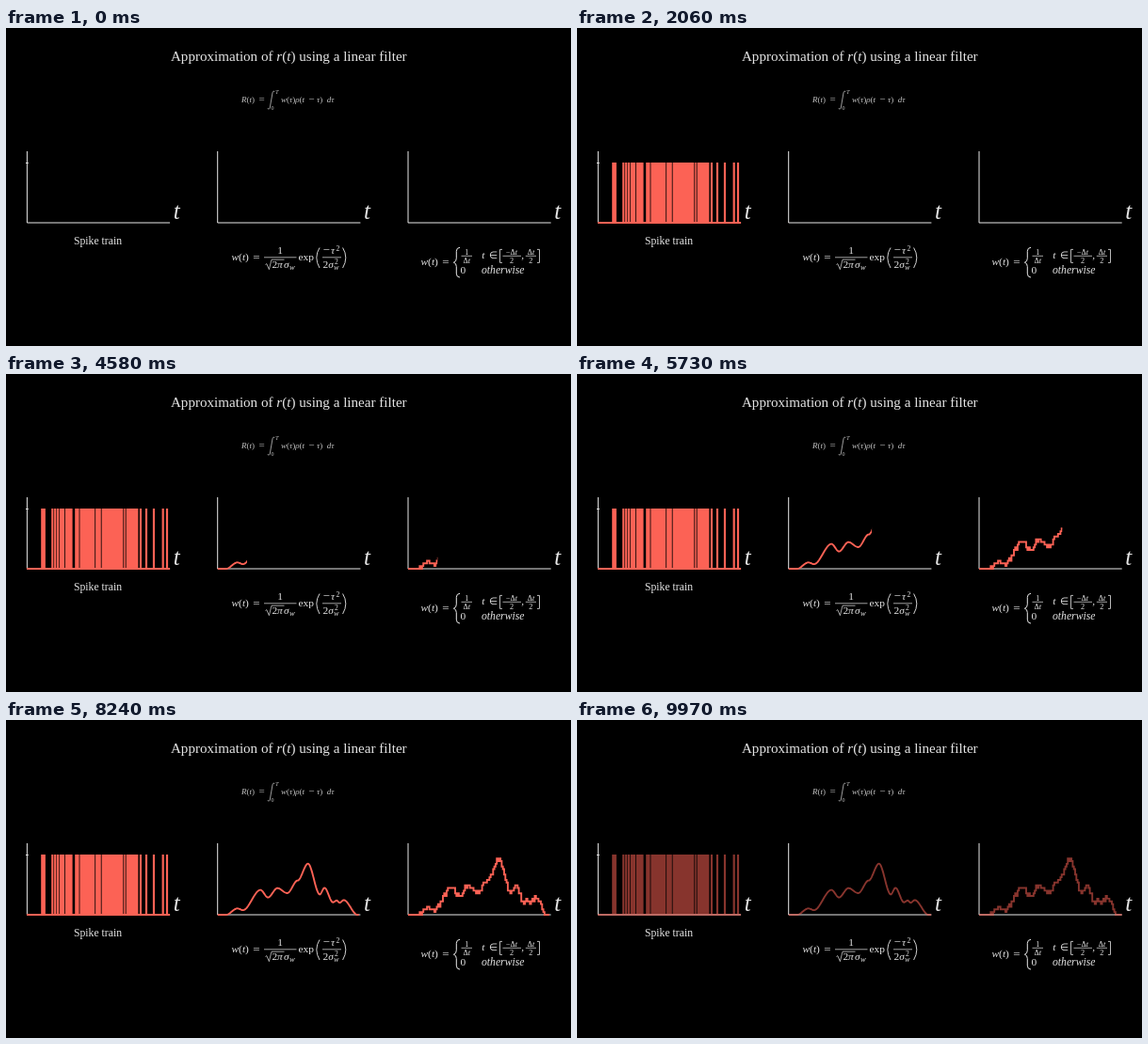
Recreate the animation shown at these times as an HTML page. Size 600x338 px, loop 10 s.

```html
<!DOCTYPE html>
<html lang="en">
<head>
<meta charset="utf-8">
<title>Linear filter</title>
<style>
html, body { margin: 0; width: 100%; height: 100%; overflow: hidden; background: #000; }
svg { display: block; width: 600px; height: 338px; }
text { fill: #e4e4e4; font-family: "Liberation Serif", serif; }
.i { font-style: italic; }
.m { text-anchor: middle; }
.line { fill: none; stroke: #e8e8e8; }
.red { fill: none; stroke: #fc6255; stroke-width: 1.9; }
</style>
</head>
<body>
<svg viewBox="0 0 600 338">
  <text class="m" x="300.3" y="35.3" font-size="15.1">Approximation of <tspan class="i">r</tspan>(<tspan class="i">t</tspan>) using a linear filter</text>
  <text class="m" x="97.5" y="230" font-size="11.7">Spike train</text>

  <g font-size="9" opacity=".85">
    <text x="250" y="78.5"><tspan class="i">R</tspan>(<tspan class="i">t</tspan>)</text>
    <text x="268.6" y="78.8" font-size="11">=</text>
    <path class="line" stroke-width=".8" d="M285.2 68c-.6-1.5-1.7-1-2.2 1l-2.6 15c-.5 2.4-1.8 3-2.4 1.2"/>
    <text class="i" x="286" y="69.5" font-size="6.4">T</text>
    <text x="281.6" y="86.5" font-size="6">0</text>
    <text x="292" y="78.5"><tspan class="i">w</tspan>(<tspan class="i">τ</tspan>)<tspan class="i">ρ</tspan>(<tspan class="i">t</tspan></text>
    <text x="321.3" y="78.8" font-size="11">−</text>
    <text x="330" y="78.5"><tspan class="i">τ</tspan>)</text>
    <text class="i" x="340.8" y="78.5">dτ</text>
  </g>

  <g font-size="11.4">
    <text x="239.5" y="247"><tspan class="i">w</tspan>(<tspan class="i">t</tspan>)</text>
    <text x="262.3" y="247.5" font-size="13">=</text>
    <text class="m" x="291" y="240">1</text>
    <path class="line" stroke-width=".7" d="M274 243.8H308.5M275.5 251.5l1.3-.9 2.6 6L282 246.2H295.5"/>
    <text x="282.4" y="255">2<tspan class="i">π</tspan></text>
    <text class="i" x="295" y="255">σ</text>
    <text class="i" x="301" y="256.7" font-size="8.6">w</text>
    <text x="310.5" y="247">exp</text>
    <path class="line" stroke-width=".9" d="M333 233.5q-6.4 10.5 0 21.5M357.6 233.5q6.4 10.5 0 21.5"/>
    <path class="line" stroke-width=".7" d="M336 243.8H356"/>
    <text x="336.5" y="240.3" font-size="13">−</text>
    <text class="i" x="345" y="240.3">τ</text>
    <text x="350.5" y="236.6" font-size="7.8">2</text>
    <text x="336.5" y="254.6">2</text>
    <text class="i" x="342.3" y="254.6">σ</text>
    <text x="349" y="251" font-size="7.6">2</text>
    <text class="i" x="348" y="257" font-size="8.2">w</text>

    <text x="440.5" y="252"><tspan class="i">w</tspan>(<tspan class="i">t</tspan>)</text>
    <text x="463.3" y="252.5" font-size="13">=</text>
    <path class="line" stroke-width="1" d="M482 233.3q-3.7.2-3.7 4v7.5q0 3.7-3 4.4 3 .7 3 4.4v7.5q0 3.7 3.7 4"/>
    <text x="482.5" y="261">0</text>
    <text class="i" x="505.3" y="245">t</text>
    <text x="513" y="245" font-size="10.5">∈</text>
    <path class="line" stroke-width=".8" d="M527 235.4h-2.5v14h2.5M564 235.4h2.5v14H564"/>
    <text x="547.3" y="245">,</text>
    <text class="i" x="505" y="260.6" font-size="11.7">otherwise</text>
  </g>

  <g class="m" font-size="8.2">
    <path class="line" stroke-width=".7" d="M483.5 242.3H495M527.5 242.3H547M551.8 242.3H563"/>
    <text x="489.3" y="240.6">1</text>
    <text x="489.3" y="249.8">Δ<tspan class="i">t</tspan></text>
    <text x="537" y="240.6">−Δ<tspan class="i">t</tspan></text>
    <text x="537" y="249.8">2</text>
    <text x="557.4" y="240.6">Δ<tspan class="i">t</tspan></text>
    <text x="557.4" y="249.8">2</text>
  </g>

  <path class="line" d="M21 143.5H23.8"/>
  <g id="axes"></g>
  <g id="plots"></g>
</svg>
<script>
const LOOP = 10000, LEFT = 22.4, PITCH = 202.3, WIDTH = 151.7, BASE = 207, TOP = 143;
const $ = id => document.getElementById(id);

function add(parent, tag, attrs) {
  const el = document.createElementNS('http://www.w3.org/2000/svg', tag);
  for (const k in attrs) el.setAttribute(k, attrs[k]);
  return parent.appendChild(el);
}

let seed = 7;
const random = () => (seed = seed * 16807 % 2147483647) / 2147483647;

// Peaks and valleys of the firing rate: [offset, height]
const turns = [
  [0, 0], [9, 0], [21, 6.7], [27, 4.9], [45.5, 26.4], [53.5, 18.4], [63.5, 28.3],
  [74, 23], [85, 36.4], [96, 54.3], [108.5, 21.6], [113.5, 28.6], [122.5, 13.2],
  [126.5, 15.2], [129.5, 12.8], [134, 15.6], [148.5, 0], [152, 0]
];
function rate(x) {
  const i = turns.findIndex(p => p[0] > x);
  const [a, b] = [turns[i - 1], turns[i]];
  const u = (x - a[0]) / (b[0] - a[0]);
  return a[1] + (b[1] - a[1]) * u * u * (3 - 2 * u);
}

function spikePath() {
  const bar = (a, b) => `M${a} ${TOP}H${b}V${BASE}H${a}Z`;
  const single = [49.3, 52.2, 55, 74.3, 76.5, 143, 149, 157, 166.7, 171];
  const gaps = [62.6, 71, 78, 94.7, 101.2, 124.8, 127.2];
  let d = bar(37.2, 41.9) + single.map(x => bar(x - 1.1, x + 1.1)).join('');
  // Dense firing, broken only by short pauses
  let from = 56.8;
  for (const g of [...gaps, 140.8]) {
    if (g !== 78) d += bar(from, g - .4);
    from = g + .4;
  }
  return d + `M22 ${BASE - .9}H174.2v1.8H22Z`;
}

function smoothPath(x0) {
  let d = `M${x0} ${BASE}`;
  for (let x = .5; x <= WIDTH; x += .5) d += `L${x0 + x} ${BASE - rate(x)}`;
  return d;
}

// Same rate as whole spike counts, with one spike of jitter
function stepPath(x0) {
  const unit = 2.85;
  let d = `M${x0} ${BASE}`;
  for (let x = 11; x < WIDTH - 3; x += 1.3) {
    const n = Math.round(rate(x) * 1.07 / unit + (random() - .5) * 1.7);
    d += `H${x0 + x}V${BASE - Math.max(0, n) * unit}`;
  }
  return d + `H${x0 + WIDTH - 2}V${BASE}H${x0 + WIDTH}`;
}

const wipes = [spikePath, smoothPath, stepPath].map((path, i) => {
  const x = LEFT + PITCH * i;
  add($('axes'), 'path', { class: 'line', d: `M${x} 131V${BASE}H${x + WIDTH}` });
  add($('axes'), 'text', { class: 'i', x: x + 155.3, y: 203, 'font-size': 25 }).textContent = 't';
  const clip = add($('plots'), 'clipPath', { id: 'wipe' + i });
  const wipe = add(clip, 'rect', { x: x - .4, y: 100, width: 0, height: 120 });
  const group = add($('plots'), 'g', { 'clip-path': `url(#wipe${i})` });
  add(group, 'path', i ? { class: 'red', d: path(x) } : { fill: '#fc6255', d: path(x) });
  return wipe;
});

const sigmoid = x => 1 / (1 + Math.exp(-x));
const edge = sigmoid(-5);
function ease(t) {
  t = Math.min(1, Math.max(0, t));
  return (sigmoid(10 * (t - .5)) - edge) / (1 - 2 * edge);
}

function draw() {
  const t = performance.now() % LOOP;
  const train = ease(t / 2000), curves = ease((t - 2000) / 7000);
  wipes.forEach((r, i) => r.setAttribute('width', (WIDTH + .6) * (i ? curves : train)));
  $('plots').setAttribute('opacity', 1 - ease((t - 9000) / 2000));
  requestAnimationFrame(draw);
}
draw();
</script>
</body>
</html>
```
